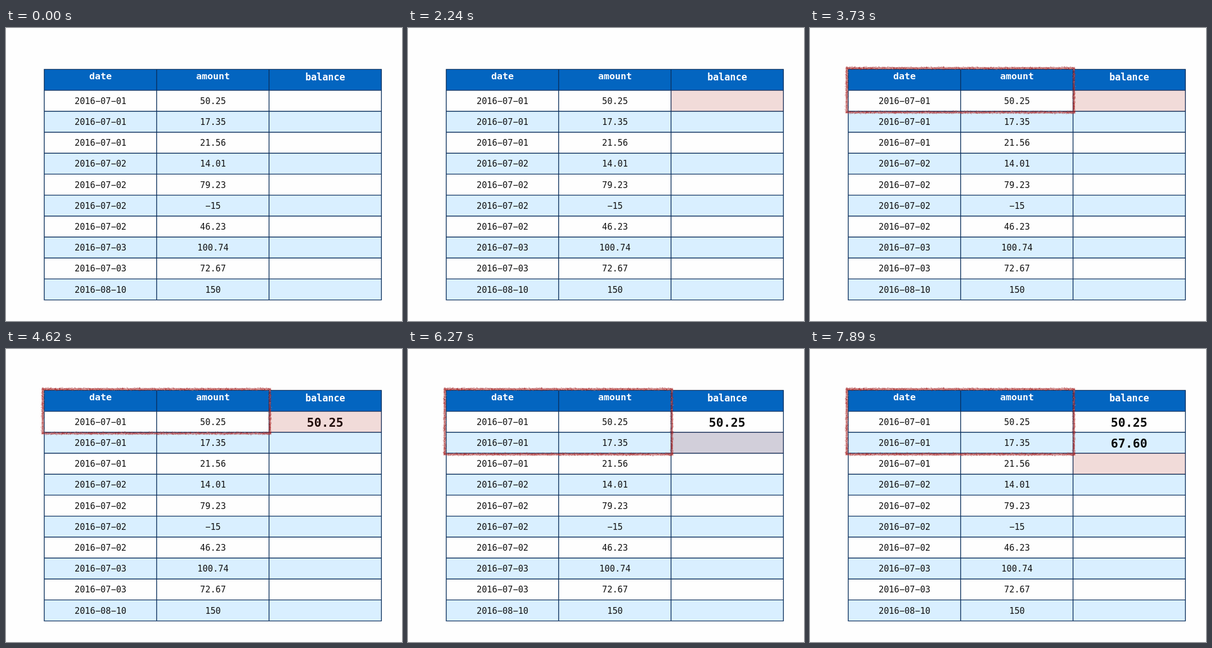
Animation of 704x520 px, one loop 8000 ms. Source, as an HTML page with a canvas:

```html
<!DOCTYPE html>
<html lang="en">
<head>
<meta charset="utf-8">
<title>Running balance</title>
<style>
html, body { margin: 0; width: 100%; height: 100%; overflow: hidden; background: #fefefe; }
canvas { display: block; }
</style>
</head>
<body>
<canvas id="stage" width="704" height="520"></canvas>
<script>
const W = 704, H = 520, LOOP = 8000;
const FONT = '"DejaVu Sans Mono", monospace';
const LEFT = 68, TOP = 73.4, COL = 199.8, ROW = 37.2;
const LINE = '#0b2f5c';

const rows = [
  ['2016-07-01', '50.25'], ['2016-07-01', '17.35'], ['2016-07-01', '21.56'],
  ['2016-07-02', '14.01'], ['2016-07-02', '79.23'], ['2016-07-02', '-15'],
  ['2016-07-02', '46.23'], ['2016-07-03', '100.74'], ['2016-07-03', '72.67'],
  ['2016-08-10', '150']
];

// Start times in ms; each entry belongs to the next table row.
const highlights = [2240, 5370, 7600];
const outlines = [2680, 6120];
const balances = [{ at: 4170, text: '50.25' }, { at: 7010, text: '67.60' }];

const ctx = document.getElementById('stage').getContext('2d');
const rowY = i => TOP + (i + 1) * ROW;
const colX = i => LEFT + i * COL;
const lastStarted = (times, t) => times.filter(at => t >= at).length - 1;

function layer(paint) {
  const c = document.createElement('canvas');
  c.width = W;
  c.height = H;
  paint(c.getContext('2d'));
  return c;
}

function label(g, text, x, y, size, color, weight = 'normal') {
  g.font = `${weight} ${size}px ${FONT}`;
  g.textAlign = 'center';
  g.fillStyle = color;
  g.fillText(text.replace(/-/g, '\u2212'), x, y);
}

function paintTable(g) {
  const right = colX(3), bottom = rowY(10);
  g.fillStyle = '#fefefe';
  g.fillRect(0, 0, W, H);
  g.fillStyle = '#0365c0';
  g.fillRect(LEFT, TOP, right - LEFT, ROW);
  g.fillStyle = '#d9efff';
  for (let i = 1; i < rows.length; i += 2) g.fillRect(LEFT, rowY(i), right - LEFT, ROW);

  g.strokeStyle = LINE;
  g.lineWidth = 1.4;
  g.beginPath();
  for (let i = -1; i <= rows.length; i++) {
    g.moveTo(LEFT - 0.7, rowY(i));
    g.lineTo(right + 0.7, rowY(i));
  }
  for (let i = 0; i <= 3; i++) {
    g.moveTo(colX(i), TOP);
    g.lineTo(colX(i), bottom);
  }
  g.stroke();

  label(g, 'date', 168, 91.3, 16.6, '#fff', 'bold');
  label(g, 'amount', 368, 91.3, 16.6, '#fff', 'bold');
  label(g, 'balance', 567.5, 92.6, 16.8, '#fff', 'bold');
  rows.forEach(([date, amount], i) => {
    label(g, date, 168, rowY(i) + 24.2, 15.3, '#111');
    label(g, amount, 368, rowY(i) + 24.2, 15.3, '#111');
  });
}

function seeded(seed) {
  return () => {
    seed = (seed * 1664525 + 1013904223) % 4294967296;
    return seed / 4294967296;
  };
}

// Rough crayon line: a faint core under small scattered flecks.
function crayon(g, x1, y1, x2, y2, rand) {
  const length = Math.hypot(x2 - x1, y2 - y1);
  const ux = (x2 - x1) / length, uy = (y2 - y1) / length;
  g.strokeStyle = 'rgba(165,35,35,0.5)';
  g.lineWidth = 3.6;
  g.beginPath();
  g.moveTo(x1, y1);
  g.lineTo(x2, y2);
  g.stroke();
  g.lineWidth = 0.9;
  for (let i = 0; i < length * 2.2; i++) {
    const along = rand() * length, off = (rand() + rand() - 1) * 3.1;
    const x = x1 + ux * along - uy * off, y = y1 + uy * along + ux * off;
    const tilt = rand() * Math.PI, size = 0.5 + rand() * 0.9;
    const dx = Math.cos(tilt) * size, dy = Math.sin(tilt) * size;
    g.strokeStyle = rand() < 0.75 ? 'rgba(160,30,32,0.5)' : 'rgba(235,170,168,0.45)';
    g.beginPath();
    g.moveTo(x - dx, y - dy);
    g.lineTo(x + dx, y + dy);
    g.stroke();
  }
}

function paintOutline(g, row) {
  const rand = seeded(17);
  const l = 65.3, r = 469.2, t = 71.2, b = rowY(row + 1) + 1.9;
  crayon(g, l - 2, t, r + 2, t, rand);
  crayon(g, r, t, r, b, rand);
  crayon(g, l, t, l, b, rand);
  crayon(g, l - 2, b, r + 2, b, rand);
}

const table = layer(paintTable);
const frames = outlines.map((_, i) => layer(g => paintOutline(g, i)));

function draw(t) {
  ctx.drawImage(table, 0, 0);
  balances.forEach(({ at, text }, i) => {
    if (t >= at) label(ctx, text, 567.3, rowY(i) + 26.9, 21.6, '#080808', 'bold');
  });
  const lit = lastStarted(highlights, t);
  if (lit >= 0) {
    ctx.fillStyle = 'rgba(170,20,10,0.15)';
    ctx.fillRect(colX(2), rowY(lit), COL, ROW);
  }
  const framed = lastStarted(outlines, t);
  if (framed >= 0) ctx.drawImage(frames[framed], 0, 0);
}

const start = performance.now();
function tick() {
  draw((performance.now() - start) % LOOP);
  requestAnimationFrame(tick);
}
tick();
</script>
</body>
</html>
```
